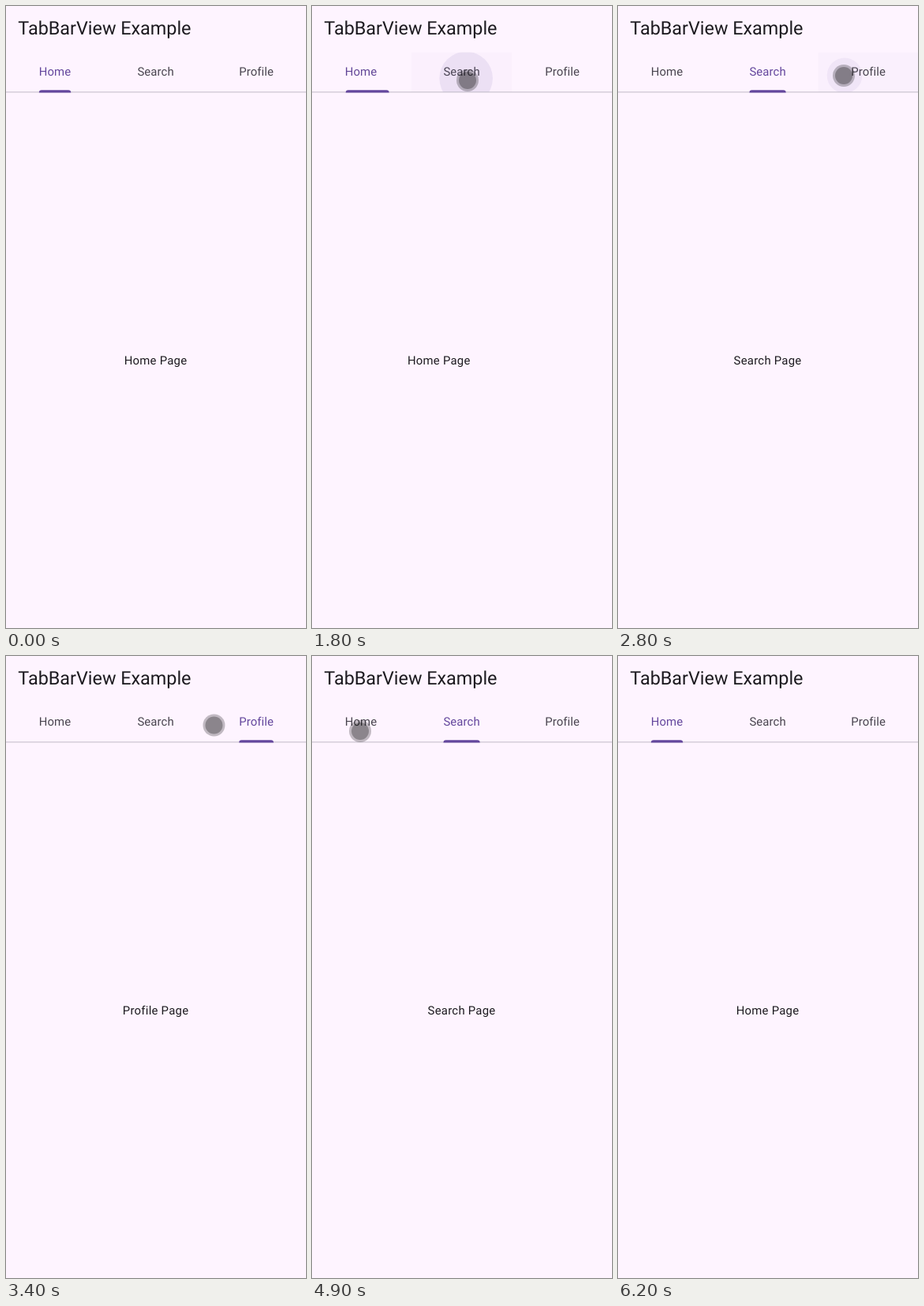
An HTML page for the animation above (7300 ms loop, 380x786 px).

```html
<!DOCTYPE html>
<html lang="en">
<head>
<meta charset="utf-8">
<title>TabBarView Example</title>
<style>
  html, body { margin: 0; width: 100%; height: 100%; overflow: hidden; background: #fef4ff; }
  svg { display: block; width: 380px; height: 786px; }
  text { font-family: Roboto, sans-serif; font-size: 14.875px; fill: #1d1b20; text-rendering: geometricPrecision; }
  .title { font-size: 23.375px; }
  .tab { text-anchor: middle; letter-spacing: .106px; }
  .page { text-anchor: middle; letter-spacing: .266px; }
</style>
</head>
<body>
<svg viewBox="0 0 380 786">
  <defs><clipPath id="tabClip"><rect id="clipRect" y="58.4" width="127.5" height="50"/></clipPath></defs>
  <text class="title" x="15.3" y="36.4">TabBarView Example</text>
  <rect y="108.2" width="380" height="1.2" fill="#cac4d0"/>
  <path id="indicator" fill="#64479d"/>
  <g clip-path="url(#tabClip)" fill="#6750a4">
    <rect id="highlight" y="58.4" width="127.5" height="50"/>
    <circle id="ripple"/>
  </g>
  <g id="labels"></g>
  <g id="cursor">
    <circle r="14" opacity=".24"/>
    <circle r="11" opacity=".28"/>
  </g>
</svg>
<script>
const LOOP = 7300, STEP = 100, SLIDE = 300;
const LEFT = -1.7, TAB_W = 127.5, TAB_Y = 83.5;
const PRIMARY = [100, 71, 157], MUTED = [73, 69, 79];
const NAMES = ['Home', 'Search', 'Profile'];

const TAPS = [
  { tab: 1, press: 1710, release: 1774 },
  { tab: 2, press: 2750, release: 2843 },
  { tab: 1, press: 3780, release: 3860 },
  { tab: 0, press: 5095, release: 5185 }
];

// each move eases to its end point; sag bends the path downwards
const ENTRY = { x: 385, y: 145 };
const MOVES = [
  { start: 200, end: 700, x: 181, y: 135, sag: 24 },
  { start: 700, end: 1300, x: 197, y: 94, sag: 0 },
  { start: 2000, end: 2400, x: 286, y: 88, sag: 0 },
  { start: 3200, end: 3800, x: 199, y: 86, sag: 0 },
  { start: 4200, end: 4900, x: 61, y: 95, sag: 0 },
  { start: 5500, end: 6200, x: 368, y: 48, sag: 23 }
];

const $ = id => document.getElementById(id);
const clamp = v => Math.min(1, Math.max(0, v));
const lerp = (a, b, p) => a + (b - a) * p;
const smooth = p => p * p * (3 - 2 * p);
const center = i => LEFT + TAB_W * (i + .5);

// cubic-bezier(.25, .1, .25, 1)
function ease(x) {
  if (x <= 0 || x >= 1) return clamp(x);
  const curve = (a, b, s) => 3 * (1 - s) ** 2 * s * a + 3 * (1 - s) * s * s * b + s ** 3;
  let lo = 0, hi = 1;
  for (let i = 0; i < 24; i++) {
    const mid = (lo + hi) / 2;
    if (curve(.25, .25, mid) < x) lo = mid; else hi = mid;
  }
  return curve(.1, 1, lo);
}

function addText(cls, text, x, y) {
  const el = document.createElementNS('http://www.w3.org/2000/svg', 'text');
  el.setAttribute('class', cls);
  el.setAttribute('x', x);
  el.setAttribute('y', y);
  el.textContent = text;
  $('labels').append(el);
  return el;
}

function set(id, attrs) {
  for (const key in attrs) $(id).setAttribute(key, attrs[key]);
}

const tabs = NAMES.map((name, i) => addText('tab', name, center(i), 88.4));
const pages = NAMES.map(name => addText('page', name + ' Page', 0, 453));

function pointer(t) {
  let at = ENTRY;
  for (const move of MOVES) {
    const p = smooth(clamp((t - move.start) / (move.end - move.start)));
    at = {
      x: lerp(at.x, move.x, p),
      y: lerp(at.y, move.y, p) + move.sag * Math.sin(p * Math.PI)
    };
  }
  return at;
}

// the leading edge runs ahead of the trailing edge
function drawIndicator(from, to, p) {
  const edges = i => {
    const half = tabs[i].getComputedTextLength() / 2;
    return [center(i) - half, center(i) + half];
  };
  const slow = 1 - Math.cos(p * Math.PI / 2), fast = Math.sin(p * Math.PI / 2);
  const right = to > from;
  const [a, b] = edges(from), [c, d] = edges(to);
  const x0 = lerp(a, c, right ? slow : fast), x1 = lerp(b, d, right ? fast : slow);
  set('indicator', { d: `M${x0} 109.4a3.2 3.2 0 0 1 3.2-3.2H${x1 - 3.2}a3.2 3.2 0 0 1 3.2 3.2z` });
}

function drawInk(tap, t) {
  const held = Math.min(t, tap.release) - tap.press;
  const since = Math.max(0, t - tap.release);
  const grow = ease(clamp(held / 1000 + since / 225));
  const radius = Math.hypot(TAB_W, 50) / 2;
  const from = pointer(tap.press);
  const x = LEFT + TAB_W * tap.tab;
  const fade = clamp((t - tap.press) / 75) * (1 - clamp((since - 225) / 150));
  set('clipRect', { x });
  set('highlight', { x, opacity: .1 * clamp((held - since) / 200) });
  set('ripple', {
    cx: lerp(from.x, center(tap.tab), grow),
    cy: lerp(from.y, TAB_Y, grow),
    r: lerp(radius * .3, radius + 5, grow),
    opacity: .1 * fade
  });
}

function drawCursor(t) {
  const { x, y } = pointer(t);
  set('cursor', {
    transform: `translate(${x} ${y})`,
    visibility: t >= 300 && t < 6200 ? 'visible' : 'hidden'
  });
}

function draw(time) {
  const t = Math.floor(time % LOOP / STEP) * STEP;
  const last = Math.max(0, TAPS.filter(tap => tap.press <= t).length - 1);
  const tap = TAPS[last];
  const from = last ? TAPS[last - 1].tab : 0;
  const p = ease(clamp((t - tap.release) / SLIDE));
  const pos = lerp(from, tap.tab, p);
  NAMES.forEach((name, i) => {
    const on = clamp(1 - Math.abs(i - pos));
    const rgb = MUTED.map((v, k) => Math.round(lerp(v, PRIMARY[k], on)));
    tabs[i].style.fill = `rgb(${rgb})`;
    pages[i].setAttribute('x', center(1) + (i - pos) * TAB_W * 3);
  });
  drawIndicator(from, tap.tab, p);
  drawInk(tap, t);
  drawCursor(t);
}

const start = performance.now();
function tick() {
  draw(performance.now() - start);
  requestAnimationFrame(tick);
}
tick();
</script>
</body>
</html>
```
